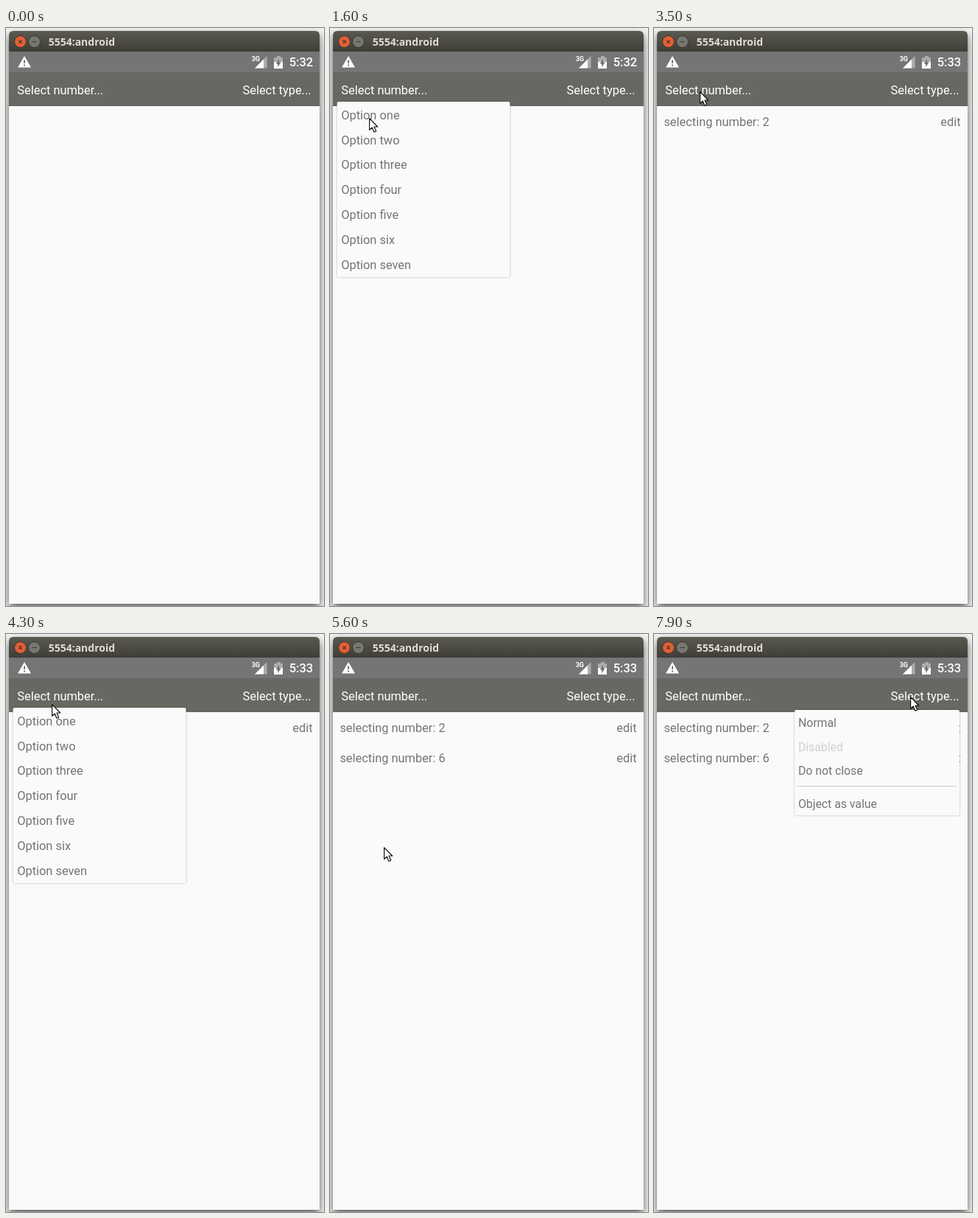
Write an HTML page that moves like this. It is 432 px wide and 784 px high and loops after 8 s.

```html
<!DOCTYPE html>
<html lang="en">
<head>
<meta charset="utf-8">
<title>Popup menu demo</title>
<style>
  html, body { margin: 0; width: 100%; height: 100%; overflow: hidden; background: #f4f4f4; }
  svg { display: block; width: 432px; height: 784px; }
  text { font: 16.4px Roboto, sans-serif; fill: #747474; }
  .bar { fill: #fff; }
  .title { font: 700 14px "Open Sans", sans-serif; fill: #dfdbd2; }
  .clock { font-weight: 500; font-size: 16.5px; fill: #fff; }
  .net { font-weight: 700; font-size: 9px; fill: #fff; }
  .end { text-anchor: end; }
  .small text { font-size: 15.8px; }
  .small .off { fill: #d0d0d0; }
  .window { filter: drop-shadow(0 5px 6px rgba(0, 0, 0, .65)); }
  .sheet { fill: #fafafa; filter: drop-shadow(0 .6px .9px rgba(0, 0, 0, .32)); }
</style>
</head>
<body>
<svg viewBox="0 0 432 784">
  <defs>
    <linearGradient id="chrome" x2="0" y2="1">
      <stop stop-color="#5b5a51"/>
      <stop offset="1" stop-color="#3e3d38"/>
    </linearGradient>
  </defs>

  <path class="window" fill="#fafafa" d="M4 10q0-6 6-6H420q6 0 6 6V781H4z"/>
  <path fill="url(#chrome)" d="M4 32V10q0-6 6-6H420q6 0 6 6V32z"/>
  <g stroke="#35342f">
    <circle cx="19.5" cy="18.5" r="8" fill="#e35f35"/>
    <circle cx="38.5" cy="18.5" r="8" fill="#77766f"/>
    <path stroke-width="1.2" d="M17.3 16.3l4.4 4.4m0-4.4l-4.4 4.4M35.5 18.5h6"/>
  </g>
  <text class="title" x="57.7" y="23.6">5554:android</text>

  <path fill="#757575" d="M4 32H426V60H4z"/>
  <path fill="#686862" d="M4 60H426V106H4z"/>
  <path fill="#fff" d="M25 38L34 53.5H16z"/>
  <path fill="#757575" d="M24 43.5h2v4.5h-2zM24 49.5h2v2h-2z"/>
  <text class="net" x="333.7" y="45">3G</text>
  <path fill="#fff" fill-opacity=".4" d="M354.5 38V54.5H338z"/>
  <path fill="#fff" d="M350 42.5V54.5H338z"/>
  <path fill="#fff" fill-opacity=".4" d="M368 38h5v2h3v6h-12v-6h4z"/>
  <path fill="#fff" d="M364 46h12v9h-12z"/>
  <path fill="#6c6c6c" d="M371 42v4.5h2.6l-4.4 6.5v-4.5h-2.5z"/>
  <text id="clock" class="clock" x="384.7" y="52.4">5:32</text>
  <text class="bar" x="15.3" y="89.6">Select number...</text>
  <text class="bar end" x="414.6" y="89.6">Select type...</text>

  <g id="rows"></g>
  <g id="numbers"></g>
  <g id="types" class="small"></g>
  <path id="cursor" fill="#fff" stroke="#111" stroke-width="1.2" stroke-linejoin="round"
        d="M.6.6V16.3L4.2 13 6.9 19.2 9.7 18 7 12H11.8z"/>
</svg>
<script>
const $ = id => document.getElementById(id);
const label = (x, y, s, cls = '') => `<text class="${cls}" x="${x}" y="${y}">${s}</text>`;
const sheet = (x, y, w, h) => `<rect class="sheet" x="${x}" y="${y}" width="${w}" height="${h}" rx="2"/>`;

$('rows').innerHTML = [2, 6].map((n, i) => '<g>' +
  label(13.4, 133 + 41 * i, 'selecting number: ' + n) +
  label(416.6, 133 + 41 * i, 'edit', 'end') + '</g>').join('');

$('numbers').innerHTML = sheet(9.5, 100, 235, 238) +
  ['one', 'two', 'three', 'four', 'five', 'six', 'seven']
    .map((s, i) => label(15.2, 123.6 + 33.9 * i, 'Option ' + s)).join('');

$('types').innerHTML = sheet(191, 103, 224, 143) +
  ['Normal', 'Disabled', 'Do not close', 'Object as value']
    .map((s, i) => label(195.9, 126.2 + 32.35 * i + (i > 2 ? 12.3 : 0), s, i == 1 ? 'off' : '')).join('') +
  '<path fill="#ccc" d="M194 206H411v1H194z"/>';

// Pointer strokes, each from where the last one ended
const strokes = [
  { from: 200, to: 900, x: 50, y: 81 },
  { from: 1300, to: 1800, x: 55, y: 149, steady: true },
  { from: 2450, to: 3500, x: 62, y: 86 },
  { from: 4250, to: 5400, x: 73, y: 289, steady: true },
  { from: 5700, to: 6600, x: 190, y: 175, steady: true },
  { from: 6600, to: 7600, x: 348, y: 85 }
];

function pointer(t) {
  let x = -14, y = 175;
  for (const s of strokes) {
    const u = Math.min(1, Math.max(0, (t - s.from) / (s.to - s.from)));
    const k = s.steady ? u : 1 - (1 - u) ** 1.9;
    x += (s.x - x) * k;
    y += (s.y - y) * k;
  }
  return [x, y];
}

// Eased growth of a menu that opens at a and shuts at b
function growth(t, a, b) {
  if (t < a || t >= b) return 0;
  const k = Math.min(1, (t - a) / 225);
  return k < .5 ? 2 * k * k : 1 - 2 * (1 - k) ** 2;
}

function show(menu, k, cx, cy) {
  menu.setAttribute('opacity', k);
  menu.setAttribute('transform', `translate(${cx} ${cy}) scale(${k}) translate(${-cx} ${-cy})`);
}

function draw(now) {
  const t = Math.floor(now % 8000 / 100) * 100;
  $('clock').textContent = t < 2000 ? '5:32' : '5:33';
  [2000, 5600].forEach((start, i) => $('rows').children[i].setAttribute('opacity', +(t >= start)));
  show($('numbers'), growth(t, 1120, 2000) + growth(t, 3720, 5600), 127, 219);
  show($('types'), growth(t, 7620, 8000), 303, 174.5);
  $('cursor').setAttribute('transform', `translate(${pointer(t).map(Math.round)})`);
  requestAnimationFrame(draw);
}
draw(performance.now());
</script>
</body>
</html>
```
